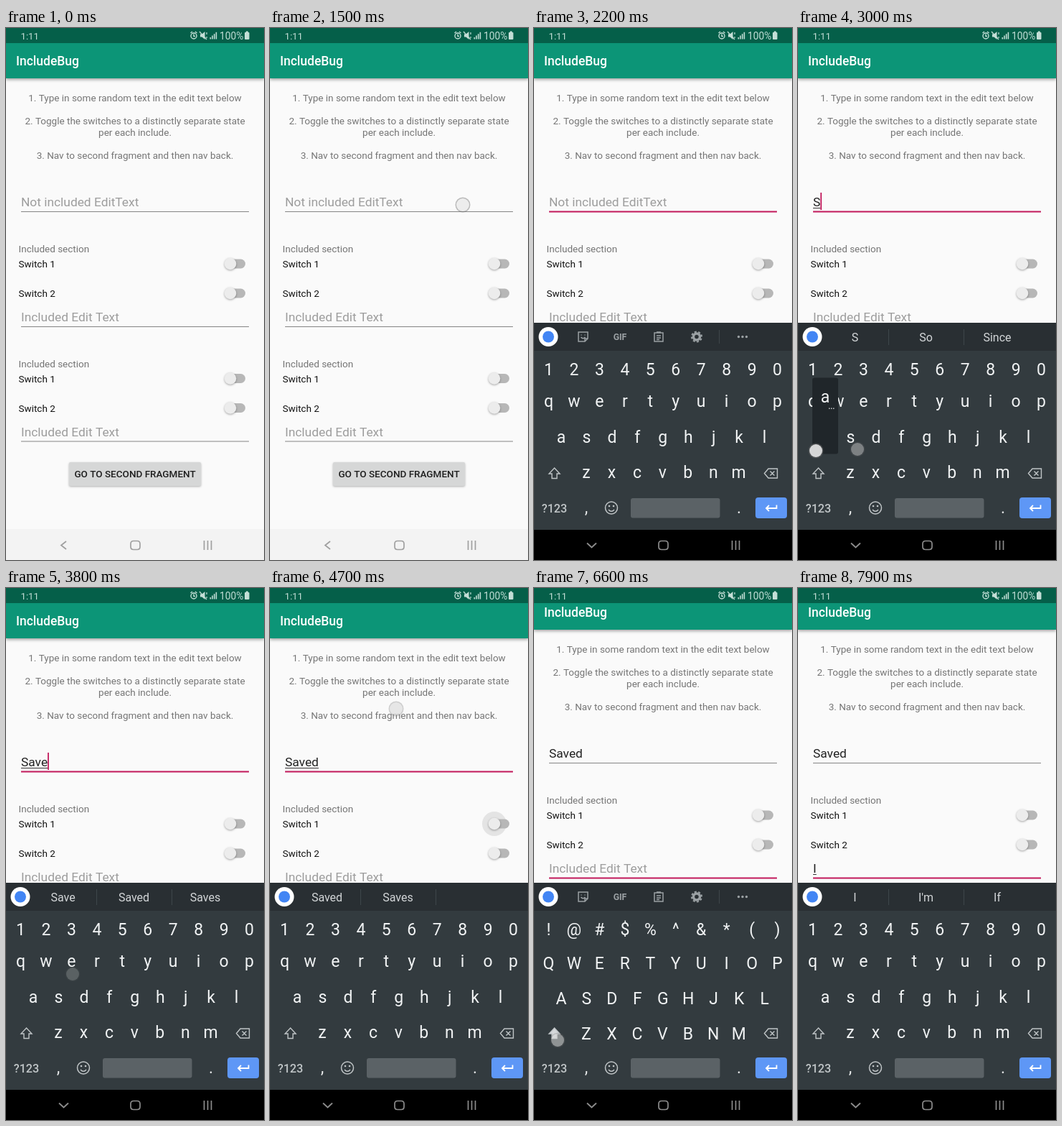
Recreate the animation shown at these times as an HTML page with a canvas. Size 360 px wide and 740 px high, loop 8 s.

```html
<!DOCTYPE html>
<html lang="en">
<head>
<meta charset="utf-8">
<title>IncludeBug</title>
<style>
  html, body { margin: 0; width: 100%; height: 100%; overflow: hidden; background: #fafafa; }
  canvas { display: block; }
</style>
</head>
<body>
<canvas id="stage" width="360" height="740"></canvas>
<script>
const ctx = document.getElementById('stage').getContext('2d');
const LOOP = 8000, ACCENT = '#c2185b';

// Finger contacts: start, end, from x, y, to x, y
const touches = [
  [1420, 1620, 269, 246], [2350, 2480, 32, 628], [2700, 2850, 83, 586],
  [2950, 3100, 25, 588], [3230, 3350, 181, 635], [3480, 3600, 93, 537],
  [3900, 4050, 110, 578], [4400, 4620, 313, 328, 176, 168],
  [4900, 5020, 205, 396], [6370, 6480, 33, 629], [7270, 7390, 268, 537]
];
// Key previews: start, end, label, column centre, row
const previews = [
  [2700, 2850, 'S', 73, 2], [2950, 3100, 'a', 38, 2], [3230, 3350, 'v', 179, 3],
  [3480, 3600, 'e', 91, 1], [3900, 4050, 'd', 108, 2], [7270, 7390, 'I', 268, 1]
];
// Edits: time, field, text, suggestions
const edits = [
  [1650, 0, ''],
  [2850, 0, 'S', ['S', 'So', 'Since']],
  [3100, 0, 'Sa', ['Sa', 'Say', 'Same']],
  [3350, 0, 'Sav', ['Sav', 'Save', 'Saving']],
  [3600, 0, 'Save', ['Save', 'Saved', 'Saves']],
  [4050, 0, 'Saved', ['Saved', 'Saves']],
  [4960, 1, ''],
  [7390, 1, 'I', ['I', "I'm", 'If']]
];
const lowerRows = ['1234567890', 'qwertyuiop', 'asdfghjkl', 'zxcvbnm'];
const upperRows = ['!@#$%^&*()', 'QWERTYUIOP', 'ASDFGHJKL', 'ZXCVBNM'];
const rowStart = [20.5, 20.5, 38, 73], rowBase = [482.5, 527, 576.5, 625.5];

const clamp = v => Math.max(0, Math.min(1, v));
const within = (t, a, b) => t >= a && t < b;

function text(str, x, y, size, color, align = 'left', weight = 400) {
  ctx.font = `${weight} ${size}px Roboto, sans-serif`;
  ctx.textAlign = align;
  ctx.fillStyle = color;
  ctx.fillText(str, x, y);
}
function rect(x, y, w, h, color, r = 0) {
  ctx.fillStyle = color;
  ctx.beginPath();
  ctx.roundRect(x, y, w, h, r);
  ctx.fill();
}
function disc(x, y, r, color) {
  ctx.fillStyle = color;
  ctx.beginPath();
  ctx.arc(x, y, r, 0, 7);
  ctx.fill();
}
function stroke(path, color, width = 1.5) {
  ctx.strokeStyle = color;
  ctx.lineWidth = width;
  ctx.stroke(new Path2D(path));
}
function fillPath(path, color) {
  ctx.fillStyle = color;
  ctx.fill(new Path2D(path));
}
function shadow(color, blur, y) {
  ctx.shadowColor = color;
  ctx.shadowBlur = blur;
  ctx.shadowOffsetY = y;
}
const noShadow = () => shadow('transparent', 0, 0);

function drawField(base, hint, value, focused, caretOn) {
  if (value) text(value, 21, base, 17.35, '#212121');
  else text(hint, 21, base, 17.35, '#9d9d9d');
  const width = value ? ctx.measureText(value).width : 0;
  if (focused) {
    rect(21, base + 6.5, 318, 2, ACCENT);
    if (value) rect(21, base + 2, width, 1, '#333');
    if (caretOn) rect(21 + width, base - 19, 1.8, 24, ACCENT);
  } else rect(21, base + 7, 318, 1, '#858585');
}
function drawSwitch(label, y) {
  text(label, 17.5, y + 5, 13.5, '#111');
  rect(308, y - 6.5, 26, 13, '#b7b7b7', 6.5);
  shadow('rgba(0,0,0,.35)', 3, 1);
  disc(313, y, 8.3, '#ececec');
  noShadow();
}
function drawPage(t, edit) {
  rect(0, 0, 360, 760, '#fafafa');
  const lines = [
    ['1. Type in some random text in the edit text below', 102],
    ['2. Toggle the switches to a distinctly separate state', 134],
    ['per each include.', 150],
    ['3. Nav to second fragment and then nav back.', 182]
  ];
  for (const [line, y] of lines) text(line, 180, y, 13.5, '#757575', 'center');

  const field = edit ? edit[1] : -1;
  const caretOn = edit && Math.floor((t - edit[0]) / 500) % 2 === 0;
  const first = field === 0 ? edit[2] : field === 1 ? 'Saved' : '';
  drawField(248, 'Not included EditText', first, field === 0, caretOn);
  for (const [i, y] of [0, 159.5].entries()) {
    text('Included section', 17.5, y + 312, 13.5, '#757575');
    if (!i && within(t, 4420, 4850)) {
      disc(313, 328, 17 * clamp((t - 4380) / 200), `rgba(0,0,0,${.09 * clamp((4850 - t) / 130)})`);
    }
    drawSwitch('Switch 1', y + 328);
    drawSwitch('Switch 2', y + 369);
    const focused = !i && field === 1;
    drawField(y + 408, 'Included Edit Text', focused ? edit[2] : '', focused, caretOn);
  }
  shadow('rgba(0,0,0,.3)', 3, 1);
  rect(88, 604, 184, 33, '#d6d7d7', 2);
  noShadow();
  text('GO TO SECOND FRAGMENT', 180, 625, 13.5, '#1f1f1f', 'center', 500);

  shadow('rgba(0,0,0,.35)', 4, 2);
  rect(0, 0, 360, 70, '#0c9577');
  noShadow();
  text('IncludeBug', 14, 52, 17.5, '#fff', 'left', 500);
}
function drawStatusBar() {
  const c = '#c3ded6';
  rect(0, 0, 360, 21, '#055f49');
  text('1:11', 20.5, 15.5, 13.2, c);
  stroke('M258 11a4 4 0 1 0 8 0a4 4 0 1 0-8 0M262 8.500v3h2M257.500 7l2.500-2M266.500 7l-2.500-2', c, 1.4);
  fillPath('M271 8.500h2.500l4-3.500v11l-4-3.500H271z', c);
  stroke('M270 5l10 11M280 6v3M280 12v2', c, 1.2);
  for (let i = 0; i < 4; i++) rect(284.5 + i * 2.7, 13 - i * 2.4, 1.6, 2.5 + i * 2.4, c);
  text('100%', 298, 15.5, 13.8, c);
  rect(333, 6, 6.5, 10, c, 1);
  rect(334.8, 4.5, 3, 2, c);
}
function drawNavIcons(open) {
  const c = open ? '#8c8c8c' : '#a0a0a0';
  stroke(open ? 'M74 716.500l6.500 6l6.500-6' : 'M84 714l-7 5.500l7 5.500', c, 1.8);
  stroke('M178 713.500h5q4 0 4 4v4q0 4-4 4h-5q-4 0-4-4v-4q0-4 4-4z', c, 1.7);
  stroke('M276.500 713v13M281.500 713v13M286.500 713v13', c, 1.7);
}
function drawToolbar(suggestions) {
  rect(0, 410, 360, 39, '#292f33');
  disc(20, 429.5, 13.5, '#fff');
  disc(20, 429.5, 8, '#4285f4');
  if (suggestions) {
    suggestions.forEach((word, i) => text(word, [79.5, 178.5, 278][i], 435.5, 16, '#d3d6d8', 'center'));
    rect(126, 419, 1, 22, '#3e464a');
    rect(231, 419, 1, 22, '#3e464a');
    return;
  }
  const c = '#9ba1a4';
  stroke('M62 423h13v9l-4 4h-9zM71 436v-4h4M65.500 430q3 3.500 6 0M66 426.500v1M71 426.500v1', c);
  text('GIF', 120, 433.5, 12.3, c, 'center', 700);
  stroke('M168 424h12v12h-12zM171 423h6M171 428h6M171 431h6M171 433.500h4', c);
  ctx.setLineDash([3, 2.5]);
  stroke('M220 429.500a7 7 0 1 0 14 0a7 7 0 1 0-14 0', c, 2);
  ctx.setLineDash([]);
  stroke('M222.500 429.500a4.500 4.500 0 1 0 9 0a4.500 4.500 0 1 0-9 0', c, 3.4);
  rect(258, 420, 1, 19, '#3e464a');
  for (const x of [285.5, 291, 296.5]) disc(x, 429.5, 1.7, c);
}
function drawKeyboard(t, suggestions) {
  const upper = within(t, 2450, 2850) || within(t, 6480, 7390);
  const soft = '#c0c5c7';
  rect(0, 449, 360, 249, '#333b3f');
  rect(0, 698, 360, 80, '#000');
  drawToolbar(suggestions);
  (upper ? upperRows : lowerRows).forEach((row, r) => {
    const y = rowBase[r] + (upper && r ? 2.5 : 0);
    [...row].forEach((key, i) => text(key, rowStart[r] + i * 35.45, y, 23, '#f1f3f4', 'center'));
  });
  const arrow = 'M28.500 612l7.500 8h-4v6.500h-7V620h-4z';
  if (upper) fillPath(arrow, '#d5d8da');
  stroke(arrow, soft, 1.4);
  stroke('M327 613h12.500v13H327l-5.500-6.500zM329.500 616.500l6 6M335.500 616.500l-6 6', soft, 1.4);
  text('?123', 28.5, 673.5, 16.2, soft, 'center', 500);
  text(',', 73, 675, 23, '#e5e7e8', 'center');
  text('.', 286, 675, 23, '#e5e7e8', 'center');
  stroke('M99.500 667.500a8.500 8.500 0 1 0 17 0a8.500 8.500 0 1 0-17 0M104 670q4 4.500 8 0', soft, 1.5);
  disc(105, 665, 1.3, soft);
  disc(111, 665, 1.3, soft);
  rect(135, 654, 124.5, 27.5, '#5b6266', 3);
  rect(309, 653, 44, 29, '#5e97f6', 4);
  stroke('M338.500 663.500v4.500H324M328 664l-4 4l4 4', '#fff', 1.8);

  for (const [start, end, key, x, r] of previews) {
    if (!within(t, start, end)) continue;
    const base = rowBase[r];
    rect(x - 18, base - 90, 36, 106, '#20262a', 3);
    text(key, x, base - 56, 23, '#f1f3f4', 'center');
    for (let i = -1; i < 2; i++) rect(x + 8 + i * 3, base - 48, 1.4, 1.4, '#d0d3d5');
  }
}
function drawTouches(t) {
  for (const [start, end, x, y, toX = x, toY = y] of touches) {
    if (!within(t, start, end + 260)) continue;
    const p = clamp((t - start) / (end - start));
    const cx = x + (toX - x) * p, cy = y + (toY - y) * p;
    ctx.globalAlpha = 1 - clamp((t - end) / 260);
    disc(cx, cy, 10.5, 'rgba(110,110,110,.45)');
    disc(cx, cy, 9, 'rgba(250,250,250,.8)');
    ctx.globalAlpha = 1;
  }
}
function draw(t) {
  const edit = edits.filter(e => e[0] <= t).pop();
  const pan = 12 * (1 - (1 - clamp((t - 5020) / 220)) ** 2);
  ctx.save();
  ctx.translate(0, -pan);
  drawPage(t, edit);
  ctx.restore();
  drawStatusBar();
  rect(0, 697, 360, 43, '#f3f3f3');
  drawNavIcons(false);

  const shown = clamp((t - 1700) / 160);
  if (shown) {
    // Paint the sliding layer over a solid backing, then blend the page through it.
    ctx.save();
    ctx.globalAlpha = shown;
    ctx.translate(0, 125 * (1 - clamp((t - 1700) / 250)) ** 2);
    drawKeyboard(t, edit && edit[3]);
    ctx.restore();
    ctx.globalAlpha = shown;
    drawNavIcons(true);
    ctx.globalAlpha = 1;
  }
  drawTouches(t);
}
function tick() {
  draw(performance.now() % LOOP);
  requestAnimationFrame(tick);
}
tick();
</script>
</body>
</html>
```
